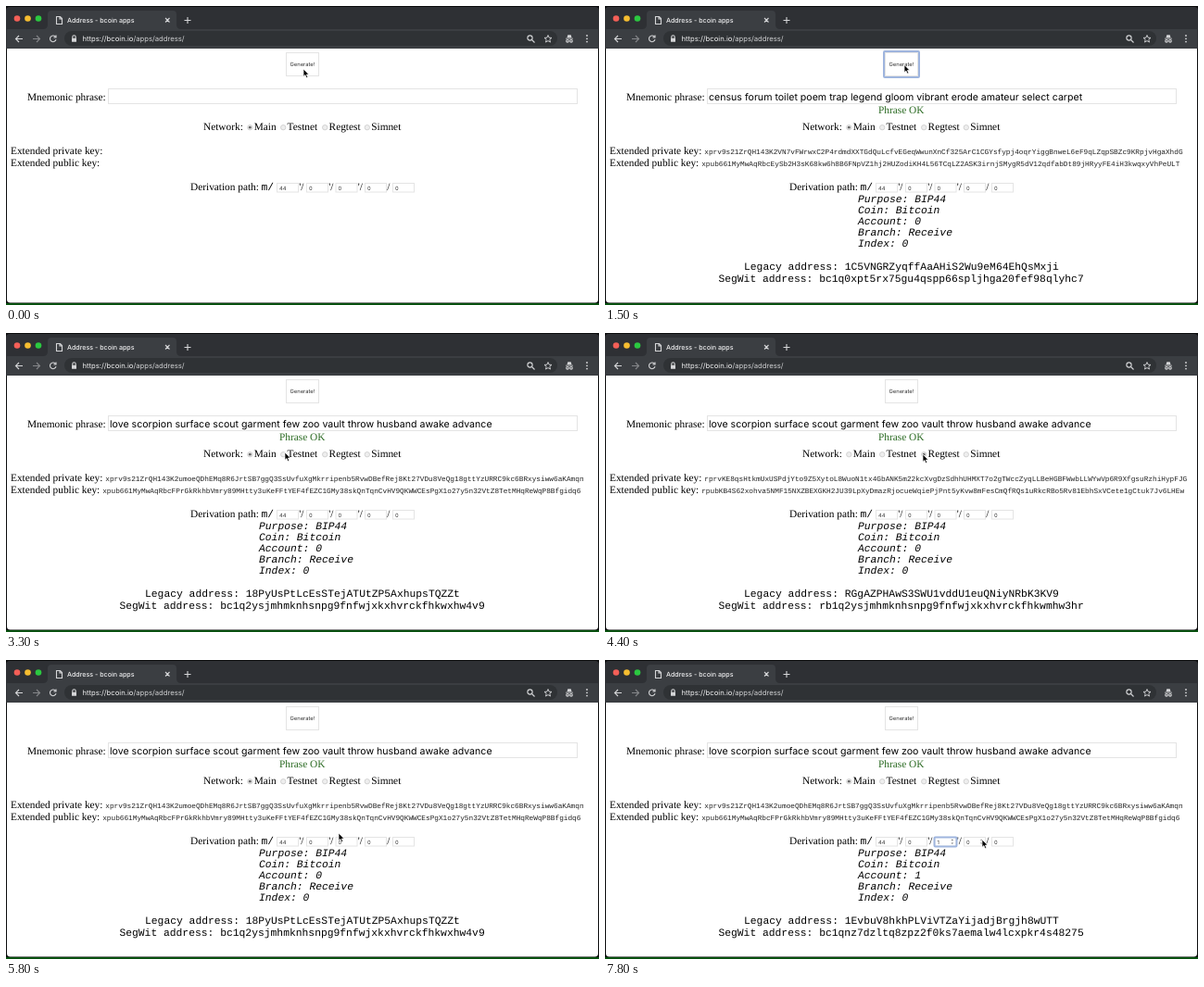
Write an HTML page that moves like this. It is 640 by 323 pixels and loops after 8 s.

```html
<!DOCTYPE html>
<html lang="en">
<head>
<meta charset="utf-8">
<title>Address</title>
<style>
  html, body { margin: 0; height: 100%; overflow: hidden; background: #111 }
  svg { display: block; width: 640px; height: 323px }
  text { text-rendering: geometricPrecision; white-space: pre; fill: #000 }
  .serif { font: 11.33px "Liberation Serif", serif }
  .mono { font: 11.33px "Liberation Mono", monospace }
  .slant { font-style: italic }
  .key { font: 7.76px "Liberation Mono", monospace; fill: #222 }
  .phrase { font: 10.6px Inter, sans-serif }
  .small { font: 5.8px Inter, sans-serif; fill: #333 }
  .tab { font: 500 7.1px Inter, sans-serif; fill: #f1f1f2 }
  .url { font: 7.7px Inter, sans-serif; fill: #f1f1f2 }
  .ok { fill: #2a6a22 }
  .box { fill: #fff; stroke: #e4e4e4 }
  .ring { fill: none; stroke: #9fb5de; stroke-width: 2 }
  .icon { fill: none; stroke: #d5d6d8; stroke-width: 1.1 }
  .solid { fill: #d5d6d8 }
</style>
</head>
<body>
<svg viewBox="0 0 640 323">
  <rect width="640" height="323" fill="#0b0c0d"/>
  <rect y="321" width="640" height="2" fill="#08500f"/>
  <path d="M0 46V5Q0 1 4 1H636Q640 1 640 5V46Z" fill="#2e3034"/>
  <path d="M1 46H639V317Q639 320.500 635.500 320.500H4.500Q1 320.500 1 317Z" fill="#fff"/>
  <path d="M1 46V25H40Q45 25 45 20V9Q45 5 49 5H180Q184 5 184 9V20Q184 25 189 25H639V46Z" fill="#3b3e42"/>
  <rect x="63" y="27" width="532" height="16" rx="8" fill="#2f3235"/>
  <circle cx="12" cy="13.500" r="3.300" fill="#f45f57"/>
  <circle cx="23.500" cy="13.500" r="3.300" fill="#f6bd30"/>
  <circle cx="35" cy="13.500" r="3.300" fill="#2bc840"/>
  <g class="icon">
    <path d="M54.500 11.500H58.500L60.500 13.500V19.500H54.500ZM58 11.500V14H60.500"/>
    <path d="M172 13L176.500 17.500M176.500 13L172 17.500M192.500 15.500H199.500M196 12V19"/>
    <path d="M18 35.500H10.500M14 32L10.500 35.500L14 39"/>
    <path d="M29 35.500H36.500M33 32L36.500 35.500L33 39" stroke="#85878a"/>
    <path d="M53.300 33.200A3.300 3.300 0 1 0 54 36.200M54 31.500V34H51.500"/>
    <path d="M71.800 35V33.500A1.700 1.700 0 0 1 75.200 33.500V35"/>
    <circle cx="565.500" cy="34.500" r="2.600"/><path d="M567.500 36.500L570.500 39.500"/>
    <path d="M585 31.500L586.100 34.200L589 34.400L586.800 36.300L587.500 39.100L585 37.600L582.500 39.100L583.200 36.300L581 34.400L583.900 34.200Z" stroke-width=".9"/>
    <circle cx="606" cy="37.800" r="1.300"/><circle cx="610" cy="37.800" r="1.300"/>
  </g>
  <g class="solid">
    <rect x="71" y="34.800" width="5" height="4" rx=".5"/>
    <path d="M604 34.800H612V35.600H604ZM605.500 34.300L606.300 31.300H609.700L610.500 34.300Z"/>
    <circle cx="627" cy="32" r=".9"/><circle cx="627" cy="35.300" r=".9"/><circle cx="627" cy="38.600" r=".9"/>
  </g>
  <text class="tab" x="66" y="18">Address - bcoin apps</text>
  <text class="url" x="82.500" y="38.200">https://bcoin.io<tspan fill="#cfd0d2">/apps/address/</tspan></text>
  <g id="page"></g>
  <path id="cursor" d="M0 0V8.200L1.900 6.500L3.200 9.500L4.700 8.900L3.400 6H5.900Z" stroke="#fff" stroke-width=".7"/>
</svg>
<script>
const page = document.getElementById('page'), cursor = document.getElementById('cursor');

const wallets = {
  angle: {
    phrase: 'angle soon knee cargo end include member deer result head crowd fashion',
    prv: 'xprv9s21ZrQH143K4YMmhBZ7z32QG4MWtP83szBXgRz5pMt8jEtSd1aE5NBGhyUGh1A6dU9gi3ezkePdnqLb9sniaKyJWwE4fDhgSUUb9GAkXhR',
    pub: 'xpub661MyMwAqRbcH2SEoD68MAy8p6C1HqquFD78UpPhNhR7c3DbAYtUdAVkZEGMXkWdg9RCJ9JeEdyXQotV2jdmQuUSVNkYP5mdJEfy169eLf6',
    legacy: '1FPjSn3ZNKuhCFhz2JmmeHZH6qwokQobkm',
    segwit: 'bc1qnh090j7dlz3c2wpgsldefmpru4fewf0z3vqma4'
  },
  census: {
    phrase: 'census forum toilet poem trap legend gloom vibrant erode amateur select carpet',
    prv: 'xprv9s21ZrQH143K2VN7vFWrwxC2P4rdmdXXTGdQuLcfvEGeqWwunXnCf325ArC1CGYsfypj4oqrYiggBnweL6eF9qLZqpSBZc9KRpjvHgaXhdG',
    pub: 'xpub661MyMwAqRbcEySb2H3sK68kw6h8B6FNpVZ1hj2HUZodiKH4L56TCqLZ2ASK3irnjSMygR5dV12qdfabDt89jHRyyFE4iH3kwqxyVhPeULT',
    legacy: '1C5VNGRZyqffAaAHiS2Wu9eM64EhQsMxji',
    segwit: 'bc1q0xpt5rx75gu4qspp66spljhga20fef98qlyhc7'
  },
  love: {
    phrase: 'love scorpion surface scout garment few zoo vault throw husband awake advance',
    prv: 'xprv9s21ZrQH143K2umoeQDhEMq8R6JrtSB7ggQ3SsUvfuXgMkrripenb5RvwDBefRej8Kt27VDu8VeQg18gttYzURRC9kc6BRxysiww6aKAmqn',
    pub: 'xpub661MyMwAqRbcFPrGkRkhbVmry89MHtty3uKeFFtYEF4fEZC1GMy38skQnTqnCvHV9QKWWCEsPgX1o27y5n32VtZ8TetMHqReWqP8Bfgidq6',
    legacy: '18PyUsPtLcEsSTejATUtZP5AxhupsTQZZt',
    segwit: 'bc1q2ysjmhmknhsnpg9fnfwjxkxhvrckfhkwxhw4v9'
  }
};
wallets.regtest = {
  ...wallets.love,
  prv: 'rprvKE8qsHtkmUxUSPdjYto9Z5XytoL8WuoN1tx4GbANK5m22kcXvgDzSdhhUHMXT7o2gTWccZyqLLBeHGBFWwbLLWYwVp6R9XfgsuRzhiHypFJG',
    pub: 'rpubKB4S62xohva5NMF15NXZBEXGKH2JU39LpXyDmazRjocueWqiePjPnt5yKvw8mFesCmQfRQs1uRkcRBo5Rv81EbhSxVCete1gCtuk7Jv6LHEw',
  legacy: 'RGgAZPHAwS3SWU1vddU1euQNiyNRbK3KV9',
  segwit: 'rb1q2ysjmhmknhsnpg9fnfwjxkxhvrckfhkwmhw3hr'
};
wallets.second = {
  ...wallets.love,
  legacy: '1EvbuV8hkhPLViVTZaYijadjBrgjh8wUTT',
  segwit: 'bc1qnz7dzltq8zpz2f0ks7aemalw4lcxpkr4s48275'
};

const shown = [[0, ''], [500, 'angle'], [1400, 'census'], [2600, 'love'],
  [4400, 'regtest'], [5300, 'love'], [6800, 'second']];
const presses = [100, 1400, 2600];
// time, x, y of the pointer tip
const path = [[0, 321, 68], [500, 321, 68], [700, 380, 79], [900, 384, 82], [1300, 323, 63.5],
  [1800, 323, 63.5], [2100, 332, 70], [2400, 323, 63.5], [2700, 323, 63.5], [3300, 301, 129],
  [3500, 302, 130], [4300, 343, 131], [4500, 343, 131], [5200, 262, 130], [5400, 262, 130],
  [5800, 359, 187], [6000, 374, 193], [6200, 374, 193], [6600, 375, 195], [7100, 375, 195], [7800, 407, 194]];

const text = (cls, x, y, s) => `<text class="${cls}" x="${x}" y="${y}">${s}</text>`;
const rect = (cls, x, y, w, h, extra = '') =>
  `<rect class="${cls}" x="${x}" y="${y}" width="${w}" height="${h}" ${extra}/>`;

function pointer(t) {
  const i = path.findIndex(p => p[0] > t);
  if (i < 0) return path[path.length - 1].slice(1);
  const [t0, x0, y0] = path[i - 1], [t1, x1, y1] = path[i];
  const k = (t - t0) / (t1 - t0);
  return [x0 + (x1 - x0) * k, y0 + (y1 - y0) * k];
}

function button(t) {
  const down = presses.some(p => t >= p && t < p + 100);
  return rect('box', 302.5, 50.5, 35, 25, down ? 'style="fill:#eee"' : '') +
    (t >= 100 && t < 2900 ? rect('ring', 301, 49, 38, 28, 'rx="1"') : '') +
    text('small', 306.5, 65.2, 'Generate!');
}

function networks(name) {
  const picked = name === 'regtest' ? 2 : 0;
  return text('serif', 213, 134, 'Network:') +
    ['Main', 'Testnet', 'Regtest', 'Simnet'].map((label, i) => {
      const x = [263.3, 299.2, 344.2, 389.8][i];
      return `<circle cx="${x}" cy="131.2" r="2.7" fill="#eee" stroke="#c4c4c4" stroke-width=".7"/>` +
        (i === picked ? `<circle cx="${x}" cy="131.2" r="1.4" fill="#666"/>` : '') +
        text('serif', x + 4.4, 134, label);
    }).join('');
}

const spinner = x =>
  `<path d="M${x} 195l1.300 -1.600l1.300 1.600zM${x} 197.500l1.300 1.600l1.300 -1.600z" fill="#777"/>`;

function derivation(t, account, x, y) {
  const values = [44, 0, account, 0, 0];
  return text('serif', 199, 199, 'Derivation path:') + text('mono', 275.5, 199, 'm/') +
    [292, 324, 355.5, 387, 417].map((left, i) => {
      const focused = i === 2 && t >= 6600;
      const hovered = x > left && x < left + 24 && y > 190 && y < 202;
      return rect('box', left + .5, 191.5, 23, 9.5) + text('small', left + 3, 198.7, values[i]) +
        (i < 4 ? text('serif', left + 24.2, 199, i < 3 ? "'/" : '/') : '') +
        (focused ? rect('ring', left, 191.5, 24, 10, 'rx="1"') : '') +
        (focused || hovered ? spinner(left + 18) : '');
    }).join('');
}

function results(w, account) {
  const info = ['Purpose: BIP44', 'Coin: Bitcoin', 'Account: ' + account, 'Branch: Receive', 'Index: 0'];
  return text('phrase', 112, 102, w.phrase) + text('serif ok', 295, 116.3, 'Phrase OK') +
    text('key', 107.3, 160, w.prv) + text('key', 104.2, 173, w.pub) +
    info.map((s, i) => text('mono slant', 273, 211.7 + i * 12, s)).join('') +
    text('mono', 150, 285.3, 'Legacy address: ' + w.legacy) +
    text('mono', 122.4, 298.3, 'SegWit address: ' + w.segwit);
}

let last = -1;
function draw(now) {
  const t = Math.floor(now % 8000 / 100) * 100;
  if (t === last) return;
  last = t;
  const name = shown.filter(s => s[0] <= t).pop()[1];
  const account = name === 'second' ? 1 : 0;
  const [x, y] = pointer(t);
  page.innerHTML = button(t) +
    text('serif', 23, 102, 'Mnemonic phrase:') + rect('box', 110.5, 89.5, 506, 16) +
    networks(name) +
    text('serif', 5, 160, 'Extended private key:') + text('serif', 5, 173, 'Extended public key:') +
    derivation(t, account, x, y) + (name ? results(wallets[name], account) : '');
  cursor.setAttribute('transform', `translate(${x} ${y})`);
}

const start = performance.now();
function tick() {
  draw(performance.now() - start);
  requestAnimationFrame(tick);
}
tick();
</script>
</body>
</html>
```
